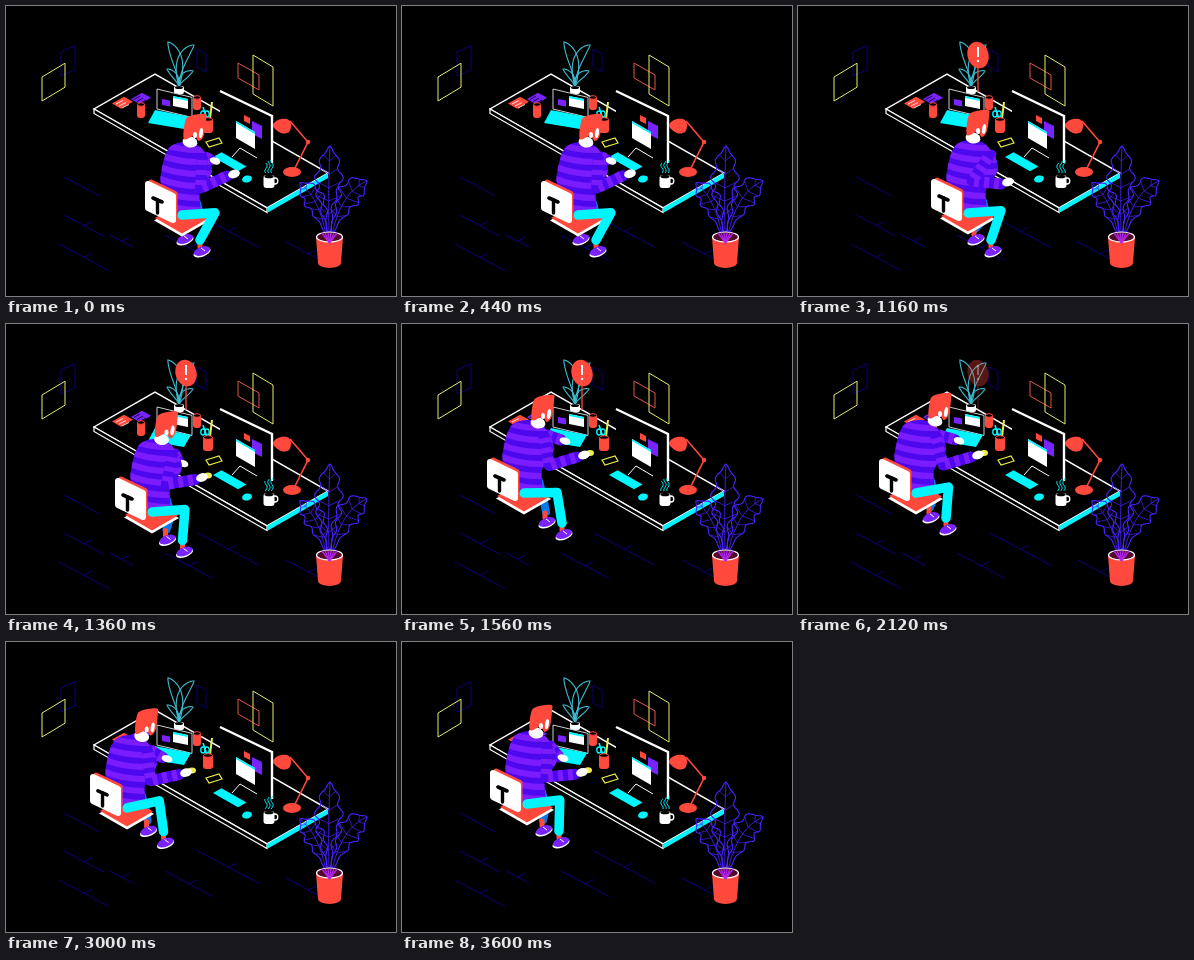
Recreate the animation shown at these times as an HTML page with a canvas. Size 390 by 290 pixels, loop 3640 ms.

```html
<!DOCTYPE html>
<html lang="en">
<head>
<meta charset="utf-8">
<title>Desk work</title>
<style>
html, body { margin: 0; width: 100%; height: 100%; overflow: hidden; background: #000; }
canvas { display: block; }
</style>
</head>
<body>
<canvas id="stage" width="390" height="290"></canvas>
<script>
const ctx = document.getElementById('stage').getContext('2d');
const LOOP = 3640, SLOPE = .572;
const RED = '#ff493d', CYAN = '#00f5ff', WHITE = '#fff', BLACK = '#000';
const YELLOW = '#eeee4b', NAVY = '#0a0078', INDIGO = '#4a22ff', TEAL = '#3fbcd0';
const SHIRT = '#4d08ee', STRIPE = '#7b1cff', VIOLET = '#7923ff';

const clamp = v => Math.max(0, Math.min(1, v));
const ease = v => { v = clamp(v); return v * v * (3 - 2 * v); };
const add = ([x, y], dx, dy) => [x + dx, y + dy];
const mix = (a, b, k) => a.map((v, i) => v + (b[i] - v) * k);

function paint(fill, stroke, width = 1) {
  if (fill) { ctx.fillStyle = fill; ctx.fill(); }
  if (stroke) { ctx.strokeStyle = stroke; ctx.lineWidth = width; ctx.stroke(); }
}

function shape(points, fill, stroke, width) {
  ctx.beginPath();
  points.forEach(p => ctx.lineTo(...p));
  ctx.closePath();
  paint(fill, stroke, width);
}

function line(points, color, width) {
  ctx.beginPath();
  points.forEach(p => ctx.lineTo(...p));
  paint(null, color, width);
}

function limb(points, color, width) {
  ctx.lineJoin = ctx.lineCap = 'round';
  line(points, color, width);
  ctx.lineJoin = 'miter';
  ctx.lineCap = 'butt';
}

function ellipse(x, y, rx, ry, fill, stroke, angle = 0, width = 1) {
  ctx.beginPath();
  ctx.ellipse(x, y, rx, ry, angle, 0, Math.PI * 2);
  paint(fill, stroke, width);
}

// Closed Catmull-Rom curve through every point.
function blob(pts, fill) {
  const n = pts.length;
  ctx.beginPath();
  ctx.moveTo(...pts[0]);
  pts.forEach((b, i) => {
    const a = pts[(i + n - 1) % n], c = pts[(i + 1) % n], d = pts[(i + 2) % n];
    ctx.bezierCurveTo(b[0] + (c[0] - a[0]) / 6, b[1] + (c[1] - a[1]) / 6,
      c[0] - (d[0] - b[0]) / 6, c[1] - (d[1] - b[1]) / 6, ...c);
  });
  paint(fill);
}

// Upright panel, and a flat tile with edges down-right and up-right.
function wall(x, y, w, h, slope, fill, stroke, width) {
  const dy = w * slope;
  shape([[x, y], [x + w, y + dy], [x + w, y + dy + h], [x, y + h]], fill, stroke, width);
}

function tile(x, y, right, left, fill, stroke, width) {
  const at = (r, l) => [x + r + l, y + (r - l) * SLOPE];
  shape([at(0, 0), at(right, 0), at(right, left), at(0, left)], fill, stroke, width);
}

function box(x, y, w, h, r, fill) {
  ctx.beginPath();
  ctx.roundRect(x, y, w, h, r);
  paint(fill);
}

function drawRoom() {
  wall(55, 46, 14, 24, -.45, null, NAVY);
  wall(36, 71, 23, 24, -.6, null, '#e6ec6a');
  wall(191, 43, 9, 18, .55, null, NAVY);
  wall(232, 57, 21, 15, .57, null, '#e0554f');
  wall(247, 49, 20, 39, .6, null, '#e6ec6a');
  const planks = [[58, 171, 35], [58, 209, 40], [53, 238, 50], [104, 229, 23],
    [192, 209, 61], [159, 229, 48], [280, 236, 45]];
  planks.forEach(([x, y, size], i) => {
    line([[x, y], [x + size, y + size * .53]], NAVY);
    if (i) line([[x + size / 2, y + size * .265], [x + size / 2 + 8, y + size * .265 - 4]], NAVY);
  });
}

function drawDesk() {
  tile(88, 103, 173, 61, BLACK, WHITE, 1.4);
  wall(88, 103, 173, 4.5, SLOPE, BLACK, WHITE, 1.2);
  wall(261, 202, 61, 5, -SLOPE, CYAN);
}

function drawCan(x, y, w, h) {
  box(x - w / 2, y, w, h, 3, RED);
  ellipse(x, y + 1.5, w / 2 - .5, 1.8, BLACK, RED);
}

function drawLaptop() {
  tile(106, 97.5, 9, 12, RED);
  tile(125, 93, 9, 11, VIOLET);
  for (let i = 0; i < 3; i++) {
    line([[110 + i * 3, 98 + i * 2], [117 + i * 3, 94.5 + i * 2]], WHITE, .8);
    line([[128 + i * 3, 93.5 + i * 2], [134 + i * 3, 90 + i * 2]], BLACK, .8);
  }
  drawCan(135, 97, 8, 15);
  wall(151, 83, 35, 20, .24, BLACK, '#ccc');
  shape([[149, 104], [185, 111], [178, 123], [142, 117]], CYAN);
  wall(167, 90, 15, 10, .2, WHITE);
  wall(167, 90, 15, 2, .2, CYAN);
  wall(156, 93, 8, 6, .2, VIOLET);
  drawCan(191, 90, 8, 14);
}

function drawMonitor() {
  wall(214, 85, 52, 46, .48, BLACK);
  line([[214, 85], [266, 110], [266, 157]], WHITE, 2.4);
  line([[226, 151], [234, 142], [251, 152]], WHITE);
  wall(238, 109, 6, 6, .5, RED);
  wall(246, 115, 10, 13, .5, VIOLET);
  wall(230, 115, 19, 17, .58, WHITE);
  wall(230, 115, 19, 2, .58, CYAN);
}

function drawTools(t) {
  line([[204, 113], [206, 96]], YELLOW, 2);
  line([[201, 113], [197, 101]], CYAN, 1.6);
  for (const x of [197, 201]) ellipse(x, 108, 2.2, 3, null, CYAN, 0, 1.4);
  drawCan(202, 112, 10, 15);
  shape([[200, 136], [213, 132], [216, 137], [203, 141]], BLACK, YELLOW, 1.2);
  tile(207, 151, 25, 8.5, CYAN);
  ellipse(241, 173, 5, 3.5, CYAN, null, -.25);

  ellipse(286, 166, 9, 5, RED);
  line([[288, 164], [302, 136], [284, 115]], RED, 1.6);
  ellipse(302, 136, 2.2, 2.2, RED);
  blob([[267, 120], [272, 114], [281, 113], [285, 118], [283, 126], [275, 127]], RED);

  ellipse(269, 175, 2.8, 3, null, WHITE, 0, 1.3);
  box(257.5, 169, 11, 13, 3, WHITE);
  ellipse(263, 170.5, 4.6, 1.8, BLACK);
  for (const x of [260, 263, 266]) {
    const steam = [];
    for (let y = 167; y > 153 + (266 - x) / 2; y--)
      steam.push([x + 1.2 * Math.sin(y * .6 + t / 130), y]);
    line(steam, CYAN, .9);
  }
}

// Leaf along a quadratic spine; waves ripple its edges and add veins.
function drawLeaf(base, bend, tip, half, waves, color) {
  const left = [], right = [], spine = [];
  const steps = 60;
  for (let i = 0; i <= steps; i++) {
    const u = i / steps, a = mix(base, bend, u), b = mix(bend, tip, u);
    const p = mix(a, b, u), angle = Math.atan2(b[1] - a[1], b[0] - a[0]);
    const ripple = waves ? .85 + .18 * Math.sin(u * waves * Math.PI * 2) : 1;
    const w = half * Math.sin(Math.PI * u ** 1.4) ** .75 * ripple;
    const nx = -Math.sin(angle) * w, ny = Math.cos(angle) * w;
    spine.push(p);
    left.push(add(p, nx, ny));
    right.push(add(p, -nx, -ny));
  }
  line([...left, ...right.reverse()], color, 1.1);
  if (!waves) return;
  right.reverse();
  line(spine, color, .9);
  for (let i = 14; i < steps - 8; i += 9)
    line([left[i + 4], spine[i], right[i + 4]], color, .7);
}

function drawSmallPlant() {
  const leaf = (bend, tip, half) => drawLeaf([173, 81], bend, tip, half, 0, TEAL);
  leaf([176, 54], [162, 36], 5);
  leaf([170, 52], [188, 39], 4.5);
  leaf([172, 70], [161, 63], 2.5);
  leaf([174, 70], [187, 65], 3);
  box(168, 80, 10, 8, 2, WHITE);
  ellipse(173, 81.5, 4, 1.5, BLACK);
}

function drawBigPlant() {
  drawLeaf([323, 229], [322, 185], [324, 140], 14, 5, INDIGO);
  drawLeaf([320, 229], [313, 192], [294, 177], 11, 4, INDIGO);
  drawLeaf([326, 229], [335, 186], [361, 175], 13, 4, INDIGO);
  shape([[310, 231], [337, 231], [335, 257], [312, 257]], RED);
  ellipse(323.5, 257, 11.5, 5, RED);
  ellipse(323.5, 231, 13, 5, '#52082a', WHITE, 0, 1.2);
  for (let x = 316; x < 332; x += 3) line([[323.5, 237], [x, 227]], '#b326f0', 1.3);
}

function drawAlert(t) {
  const size = ease((t - 710) / 260), alpha = clamp((2160 - t) / 120);
  if (!size || !alpha) return;
  ctx.save();
  ctx.globalAlpha = alpha;
  ctx.translate(180, 86);
  ctx.scale(size, size);
  line([[0, 0], [0, -25]], RED, 1.3);
  ellipse(0, -37, 10.5, 13.5, RED, null, -.25);
  line([[0, -45], [0, -35]], WHITE, 2);
  ellipse(0, -31, 1.2, 1.2, WHITE);
  ctx.restore();
}

// body moves the chair too; head and foot are relative to it, hand is on the stage.
const typing = { body: [54, 40], head: [135, 82], hand: [228, 168], foot: [142, 205] };
const alerted = { ...typing, body: [55, 40], head: [139, 81] };
const turned = { body: [48, 38], head: [132, 80], hand: [210, 176], foot: [147, 207] };
const arrived = { body: [0, 0], head: [141, 85], hand: [182, 131], foot: [162, 210] };
const settled = { body: [-4, 0], head: [146, 83], hand: [180, 131], foot: [154, 205] };
const swung = { ...settled, foot: [164, 201] };
const swivelled = { ...settled, body: [3, -7], head: [136, 84], foot: [156, 207] };
const moves = [
  { from: typing, to: alerted, start: 640, end: 800 },
  { from: alerted, to: turned, start: 960, end: 1160 },
  { from: turned, to: arrived, start: 1160, end: 1560 },
  { from: arrived, to: settled, start: 1560, end: 1840 },
  { from: settled, to: swung, start: 2160, end: 2440 },
  { from: swung, to: swivelled, start: 2800, end: 3240 }
];

function poseAt(t) {
  const { from, to, start, end } = moves.findLast(m => t >= m.start) ?? moves[0];
  const k = ease((t - start) / (end - start)), pose = {};
  for (const part in from) pose[part] = mix(from[part], to[part], k);
  return pose;
}

// Middle joint of a two-part limb; side picks the way it bends.
function joint([ax, ay], [bx, by], upper, lower, side) {
  const gap = Math.hypot(bx - ax, by - ay), d = Math.min(gap, upper + lower);
  const bend = Math.acos(clamp((upper ** 2 + d ** 2 - lower ** 2) / (2 * upper * d)));
  const angle = Math.atan2(by - ay, bx - ax) + side * bend;
  return [ax + upper * Math.cos(angle), ay + upper * Math.sin(angle)];
}

function sleeve(points) {
  limb(points, SHIRT, 11);
  ctx.lineJoin = 'round';
  ctx.setLineDash([5, 5]);
  line(points, STRIPE, 11);
  ctx.setLineDash([]);
  ctx.lineJoin = 'miter';
}

function drawShoe([x, y]) {
  limb([[x - 2, y - 9], [x - 2, y - 4]], RED, 5);
  ellipse(x, y + 1.5, 9, 4.2, WHITE, null, -.35);
  ellipse(x, y, 8.5, 4.2, VIOLET, null, -.35);
  line([[x - 1, y - 3], [x + 3, y]], WHITE);
}

function drawTorso() {
  blob([[128, 96], [110, 101], [102, 122], [102, 142], [118, 169],
    [139, 166], [140, 146], [152, 124], [142, 103]], SHIRT);
  ctx.save();
  ctx.clip();
  for (let y = 100; y < 180; y += 12) {
    ctx.beginPath();
    ctx.moveTo(98, y - 4);
    ctx.quadraticCurveTo(122, y + 7, 156, y + 3);
    paint(null, STRIPE, 6);
  }
  ctx.restore();
}

function drawSeat() {
  tile(97, 174.5, 25, 24, WHITE, WHITE, 3);
  tile(97, 172, 25, 24, RED, RED, 2);
}

function drawBackrest() {
  ctx.lineJoin = 'round';
  wall(91, 136, 24, 25, .48, RED, RED, 5);
  wall(88, 138, 25, 24, .48, WHITE, WHITE, 6);
  ctx.lineJoin = 'miter';
  limb([[93, 152], [102, 156]], BLACK, 3.6);
  limb([[97.5, 154], [97.5, 167]], BLACK, 3.4);
}

function drawHead() {
  ellipse(-5, 14, 7.5, 5.5, WHITE, null, .2);
  blob([[-10, -6], [-5, -12], [10, -14], [11, -8], [9, 7], [4, 13], [-1, 8], [-11, 11]], RED);
  ellipse(6, 5, 1.9, 5, WHITE, null, .15);
  ellipse(0, 7, 2, 3, WHITE);
}

function placed([x, y], draw) {
  ctx.save();
  ctx.translate(x, y);
  draw();
  ctx.restore();
}

function drawMan(t) {
  const { body, head, hand, foot } = poseAt(t);
  const on = p => add(p, ...body);
  const busy = t < 960 || t > 1600 ? 1 : 0;
  const near = add(hand, 0, busy * .7 * Math.sin(t / 45));
  const far = add(hand, -19, -14 + busy * Math.sin(t / 35 + 2));
  const shoe = on(foot), rear = add(shoe, -17, -12);
  const hip = on([122, 169]), ankle = add(shoe, -2, -11);
  const shoulder = on([142, 114]), wrist = add(near, -7, 2);

  limb([on([137, 157]), on([141, 172]), add(rear, -1, -10)], '#0878e8', 8);
  drawShoe(rear);
  placed(body, drawSeat);
  sleeve([on([145, 111]), add(far, -4, -1)]);
  ellipse(...far, 5.5, 3.5, WHITE, null, .3);
  placed(body, drawTorso);
  drawShoe(shoe);
  limb([hip, joint(hip, ankle, 33, 31, -1), ankle], CYAN, 9.5);
  placed(body, drawBackrest);
  placed(on(head), drawHead);
  sleeve([shoulder, joint(shoulder, wrist, 28, 29, 1), wrist]);
  if (body[0] < 30) ellipse(near[0] + 6, near[1] - 2, 4, 3, YELLOW);
  ellipse(...near, 6, 4.2, WHITE, null, -.3);
}

function render(t) {
  ctx.fillStyle = BLACK;
  ctx.fillRect(0, 0, 390, 290);
  drawRoom();
  drawDesk();
  drawSmallPlant();
  drawAlert(t);
  drawLaptop();
  drawMonitor();
  drawTools(t);
  drawBigPlant();
  drawMan(t);
}

let start;
function frame(now) {
  start ??= now;
  render(Math.floor(((now - start) % LOOP) / 40) * 40);
  requestAnimationFrame(frame);
}
render(0);
requestAnimationFrame(frame);
</script>
</body>
</html>
```
